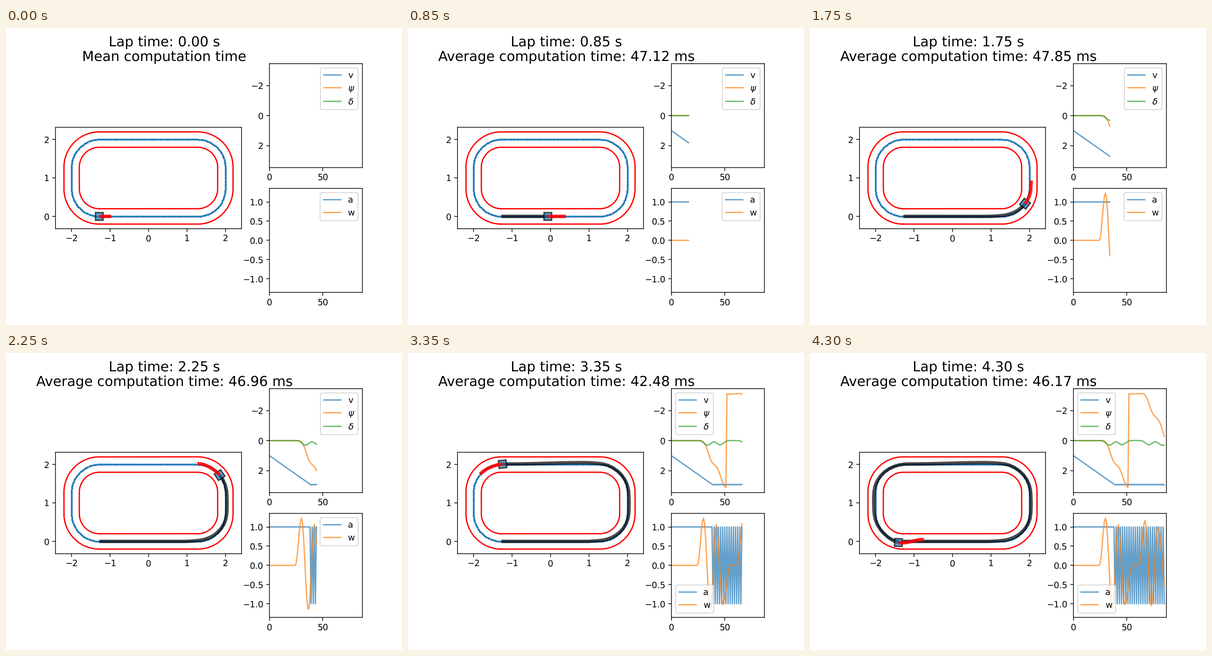
Write a matplotlib script that moves like this. It is 864 px wide and 648 px high and loops after 4350 ms.

```python
import numpy as np
import matplotlib.pyplot as plt
from matplotlib.animation import FuncAnimation
from matplotlib.patches import Rectangle

plt.rcParams.update({"path.snap": False, "text.hinting": "none"})

DT = 0.05
STEPS = 87
STRAIGHT, SIDE, RADIUS = 2.56, 0.56, 0.72
ARC = RADIUS * np.pi / 2
LAP = 2 * (STRAIGHT + SIDE + 2 * ARC)
SIZE = 0.2


def ease(x, *keys):
    """Cosine easing through (position, value) keys."""
    xs, ys = np.array(keys).T
    n = np.clip(np.searchsorted(xs, x) - 1, 0, len(xs) - 2)
    u = np.clip((x - xs[n]) / (xs[n + 1] - xs[n]), 0, 1)
    return ys[n] + (ys[n + 1] - ys[n]) * (1 - np.cos(np.pi * u)) / 2


def integrate(rates):
    return DT * np.r_[0, np.cumsum(rates)[:-1]]


# Track centre line, integrated from its heading
knots = np.cumsum([0] + [STRAIGHT, ARC, SIDE, ARC] * 2 + [STRAIGHT])
headings = np.cumsum([0] + [0, np.pi / 2] * 4 + [0])
grid = np.linspace(0, knots[-1], 8001)
mid = (grid[1:] + grid[:-1]) / 2
line = -STRAIGHT / 2 + np.r_[0, np.cumsum(
    np.exp(1j * np.interp(mid, knots, headings)) * np.diff(grid))]


def place(s, offset=0.0):
    """Point at arc length s, shifted to the left by offset."""
    z = np.interp(s, grid, line.real) + 1j * np.interp(s, grid, line.imag)
    z = z + 1j * offset * np.exp(1j * np.interp(s, knots, headings))
    return z.real, z.imag


def drift(s):
    """Sideways error: cut in before each corner, run wide after it."""
    return ease(s, (2.2, 0), (2.75, .03), (3.95, -.045), (4.9, 0),
                (5.8, -.05), (7.8, -.015), (8.2, .01), (9.33, -.05),
                (10.2, 0), (10.7, -.04), (11.3, .05))


# Speed rises until the limit, then the throttle chatters
k = np.arange(STEPS)
accel = np.where((k <= 38) | (k % 2 == 0), 1.0, -1.0)
speed = 1 + integrate(accel)

# Steering swings once per corner; the heading follows from it
rate = ease(k, (24.3, 0), (30, 1.23), (36.5, -1.17), (42, 1.06),
            (48, -1.02), (55.2, .01), (61.5, .02), (67, 1.17),
            (73, -1.05), (79, 1.0), (87.5, -.9))
steer = integrate(rate)
yaw = integrate(speed * np.tan(steer))
yaw *= 3.16 / yaw[52]
wrapped = (yaw + np.pi) % (2 * np.pi) - np.pi

# The wide line on the second half costs a little progress
travel = np.r_[0, np.cumsum(DT * (speed[1:] + speed[:-1]) / 2)]
progress = travel - np.interp(k * DT, [2.5, 4.3], [0, 0.08])
path_x, path_y = place(progress, drift(progress))

# Mean solver time, refreshed every ten steps
means = [333.65, 47.12, 48.40, 47.85, 46.96, 46.98, 42.48, 44.31, 46.17]

fig = plt.figure(figsize=(6.4, 4.8), dpi=135)
gs = fig.add_gridspec(2, 2, width_ratios=[2, 1])
ax = fig.add_subplot(gs[:, 0])
ax_state = fig.add_subplot(gs[0, 1])
ax_input = fig.add_subplot(gs[1, 1])
title = fig.text(0.4, 0.973, "", size=16, ha="center", va="top",
                 linespacing=1.15)

ax.set_aspect("equal")
ax.set_xlim(-2.42, 2.42)
ax.set_ylim(-0.32, 2.32)
ax.scatter(*place(np.linspace(0, LAP, 240, endpoint=False)), s=2,
           color="tab:blue", zorder=2)
lap = np.linspace(0, LAP, 600)
for side in (-0.2, 0.2):
    ax.plot(*place(lap, side), color="red")

trail, = ax.plot([], [], color="black", lw=4, alpha=0.7,
                 solid_capstyle="butt")
car = Rectangle((0, 0), SIZE, SIZE, rotation_point="center", fc="tab:blue",
                ec="black", lw=1.5, alpha=0.7, zorder=2.5)
ax.add_patch(car)
plan, = ax.plot([], [], color="red", lw=4, alpha=0.87, zorder=3,
                solid_capstyle="butt")


def add_curves(axis, limits, **series):
    axis.set_xlim(0, STEPS)
    axis.set_ylim(*limits)
    curves = [(axis.plot([], [], alpha=0.7, label=name)[0], data)
              for name, data in series.items()]
    axis.legend(loc="best")
    return curves


top = 1.1 * np.pi
curves = add_curves(ax_state, (top, -top),
                    **{"v": speed, r"$\psi$": wrapped, r"$\delta$": steer})
curves += add_curves(ax_input, (-1.353, 1.353), a=accel, w=rate)


def update(i):
    if i:
        note = f"Average computation time: {means[i // 10]:.2f} ms"
    else:
        note = "Mean computation time"
    title.set_text(f"Lap time: {i * DT:.2f} s\n{note}")

    car.set_xy((path_x[i] - SIZE / 2, path_y[i] - SIZE / 2))
    car.set_angle(np.degrees(yaw[i]))
    trail.set_data(path_x[:i + 1], path_y[:i + 1])

    reach = 0.31 + 0.18 * (speed[i] - 1)
    ahead = progress[i] + np.linspace(0, reach, 12)
    plan.set_data(*place(ahead, drift(ahead)))

    for curve, data in curves:
        curve.set_data(k[:i], data[:i])
    return [title, car, trail, plan] + [c for c, _ in curves]


anim = FuncAnimation(fig, update, frames=STEPS, interval=50, repeat=True,
                     repeat_delay=0, blit=False)
plt.show()
```
